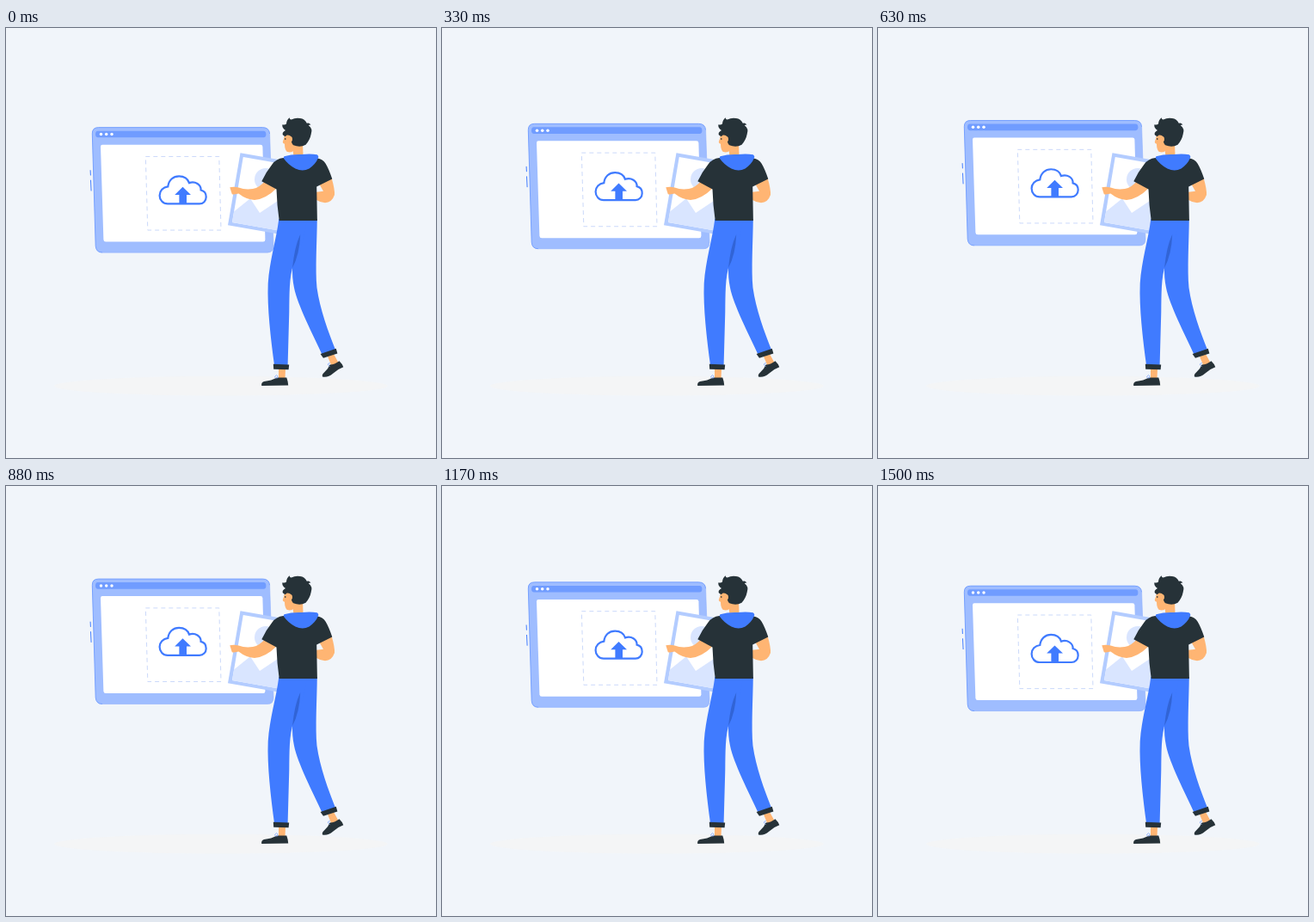
Recreate the animation shown at these times as an HTML page with a canvas. Size 500 by 500 pixels, loop 1540 ms.

```html
<!DOCTYPE html>
<html lang="en">
<head>
<meta charset="utf-8">
<title>Cloud upload</title>
<style>
  html, body { margin: 0; width: 100%; height: 100%; overflow: hidden; background: #f1f5fa; }
  canvas { display: block; width: 500px; height: 500px; }
</style>
</head>
<body>
<canvas id="stage" width="500" height="500"></canvas>
<script>
const ctx = document.getElementById('stage').getContext('2d');

const LOOP = 1540, STEPS = 37, FPS = 24, LIFT = 10;
const BLUE = '#407bff', DARK = '#263238', SKIN = '#ffb573', WHITE = '#ffffff', PALE = '#d9e5ff';

function fill(d, color) {
  ctx.fillStyle = color;
  ctx.fill(new Path2D(d));
}

function stroke(d, color, width, dash = []) {
  ctx.strokeStyle = color;
  ctx.lineWidth = width;
  ctx.setLineDash(dash);
  ctx.stroke(new Path2D(d));
  ctx.setLineDash([]);
}

function ellipse(x, y, rx, ry, color) {
  ctx.fillStyle = color;
  ctx.beginPath();
  ctx.ellipse(x, y, rx, ry, 0, 0, Math.PI * 2);
  ctx.fill();
}

function drawTablet() {
  const body = 'M107.5 116 H298.5 Q306 116 306.6 123.5 L311 254 Q311.2 261.7 304 261.7 H112 Q104.8 261.7 104.2 254 L100.2 123.5 Q100 116 107.5 116 Z';
  fill(body, '#9fbdff');
  stroke('M112 261.6 Q104.8 261.6 104.2 254 L100.3 123.5 Q100.1 116.2 107.5 116.2 H298.5 Q306 116.2 306.6 123.5', '#6f9bff', 0.9);
  stroke('M306.6 123.5 L311 254 Q311 261.6 304 261.6 H112', '#8fb0fd', 0.6);

  fill('M106.5 120.2 H299.5 Q302.4 120.2 302.4 124 Q302.4 127.8 299.5 127.8 H107 Q104 127.8 104 124 Q104 120.2 106.5 120.2 Z', '#709cff');
  for (const x of [110.5, 116.7, 123]) ellipse(x, 124, 1.75, 1.75, WHITE);

  fill('M112 136.2 H296 Q298.3 136.2 298.4 138.5 L301.4 246.5 Q301.4 249 299 249 H116 Q113.5 249 113.4 246.5 L110 138.5 Q110 136.2 112 136.2 Z', WHITE);
  stroke('M162.3 150 H247.8 L250 235.6 H164.8 Z', '#cbd9fa', 1, [5, 4]);

  stroke('M188 205 C182.5 205 178.6 200.6 178.6 195.2 C178.6 189.8 182.6 185.6 188.3 185 C189.2 177.4 194.4 172.9 201.2 172.9 C207 172.9 211.4 175.8 213 180.7 C220 178.2 227 182.8 226.6 189 C230.8 190 232.7 193.2 232.7 197 C232.7 201.5 229.3 205 225 205 Z', BLUE, 2.2);
  fill('M205.5 185.4 L215 194.6 H210 V204.6 H201.4 V194.6 H196.2 Z', BLUE);

  stroke('M98.1 165.8 L98.4 172', BLUE, 1);
  stroke('M98.5 177.3 L99.1 190', BLUE, 1);
}

function drawPhoto() {
  fill('M272.5 145.3 L334 156 L319.5 240 L258 229.3 Z', '#b3ccff');
  fill('M275.8 150 L330 159.4 L317 235.4 L263 226 Z', WHITE);
  ellipse(302, 176, 13, 13, PALE);
  fill('M265 213.5 L284 198.3 L295 215 L316 201 L322 203 L317 235.4 L263 226 Z', PALE);
}

function drawLegs() {
  fill('M317 396 H325 L324.5 408 H317 Z', SKIN);
  fill('M374 382 L381 379 L387 390 L379 394 Z', SKIN);

  fill('M297.2 416 Q296.5 412 300 411 Q309 410 315 406.5 H326.3 Q328 411 328.2 415.6 Z', DARK);
  fill('M368 405.5 Q367 403 370 400.5 Q375 396 376.5 391.5 Q382 391.5 387.5 387.3 Q391 390.5 392.3 394.3 Q386 396.5 380.5 401.5 Q374 407 368 405.5 Z', DARK);
  stroke('M315.5 407 Q310 407 314.5 403.5 Q317 404.5 315.5 407', '#8fb0fd', 0.9);
  stroke('M376.5 393.5 Q372 390.5 376.8 389.5', '#8fb0fd', 0.9);

  fill('M330 222 H361.8 C361.5 250 359.5 280 361.5 302 C365 327 375 354 383.2 374.5 L368.3 381 C357 357 339 322 335 302 Q332.5 290 333 276 Z', BLUE);
  fill('M317.3 222 H350 Q347 250 334.5 274 C329 290 329.7 310 329.3 330 L327.6 392 H312 C308 362 303.5 325 304.7 297 C306.5 270 314.5 245 317.3 222 Z', BLUE);
  fill('M342.2 240 Q335.5 254 333 279 Q341.5 263 342.2 240 Z', '#3164d6');

  fill('M310.8 390.8 L329.2 391.6 L328.6 397.3 L311.2 396.8 Z', DARK);
  fill('M365.6 379 L383.8 372.8 L385.4 378.4 L369 383.8 Z', DARK);
}

function drawTorso() {
  fill('M301 178 Q295 185.5 287 187 Q278 188.5 270.5 185.4 Q265 184 260.3 185.2 L262.8 193.2 Q266.5 193.8 270.5 192.6 Q279 199.5 289 200 Q302 199 315 186 Z', SKIN);
  fill('M364 181 L378.5 174 Q382.5 188 382 194 Q379 203 371 203.2 Q365 202.8 360.5 199.8 V190.8 Q366 190.2 369 189.8 Z', SKIN);
  fill('M322.5 151 Q314 152 309.5 158.5 Q302 168 297.3 178.2 L314.5 187.5 Q315 206 317.7 224 H361.9 L361.2 184.5 L379.3 175.5 Q375 163 371.5 157.5 Q368.5 152.5 362 151.5 Z', DARK);
}

function drawHead() {
  fill('M333 136 L345 134 L345.6 150 Q340 152.5 334.5 150 Z', SKIN);
  fill('M325 121 Q323.5 127 321.8 132.6 Q321.8 134.3 324 134.7 Q324 141 326.5 143.7 Q331 145.8 335 142.5 L342 130 L336 118 Z', SKIN);
  ellipse(324.8, 129, 0.7, 1.1, DARK);
  stroke('M323.6 125.8 L325.8 125', DARK, 0.9);
  fill('M324.4 125.7 Q320.5 124.5 322 121.4 Q323.5 119.7 325 119 Q320.5 116 321.4 112.2 Q324 113.3 326 111.5 Q326 107 329.8 104.2 Q329.5 106.5 331.8 106.5 Q336.5 104 342 105 Q347.5 105.5 349.8 110.8 Q353.2 109.4 354.4 113 Q353.2 112 351.8 113.2 Q357 116.8 354.7 123.5 Q353.5 130 348.5 135.8 Q342 139.5 334.2 136.3 Q331 133.5 332 126.7 Q328.5 123 324.4 125.7 Z', DARK);
  ellipse(330.9, 129.3, 2.1, 3.1, SKIN);

  fill('M323.4 149.2 Q333 146.4 344 147 Q354 146 361.7 147.2 Q364.2 149 362.8 151.6 Q360 158.5 352.5 163.5 Q345 167.5 336.5 163.5 Q328 159 322.6 151.2 Z', BLUE);
}

// Index of the 24 fps step on show, with start times rounded to 10 ms.
function stepAt(time) {
  let i = 0;
  while (i + 1 < STEPS && Math.round((i + 1) * 100 / FPS) * 10 <= time) i++;
  return i;
}

function draw(now) {
  const phase = ((stepAt(now % LOOP) + 1) / STEPS) % 1;
  const lift = LIFT * (1 - Math.abs(2 * phase - 1));

  ctx.fillStyle = '#f1f5fa';
  ctx.fillRect(0, 0, 500, 500);
  ellipse(250, 416.2, 193.9, 11.3, '#f4f5f6');

  ctx.save();
  ctx.translate(0, -lift);
  drawTablet();
  ctx.restore();

  drawPhoto();
  drawLegs();
  drawTorso();
  drawHead();
}

let start;
function tick(now) {
  start ??= now;
  draw(now - start);
  requestAnimationFrame(tick);
}
draw(0);
requestAnimationFrame(tick);
</script>
</body>
</html>
```
